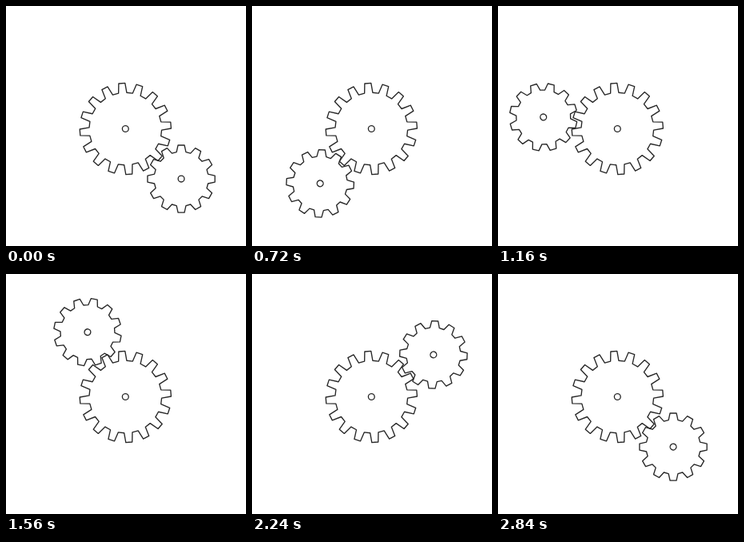
Animation, 300 px wide and 300 px high, one loop 2880 ms. Source, as an HTML page:

```html
<!DOCTYPE html>
<html lang="en">
<head>
<meta charset="utf-8">
<title>Rolling gears</title>
<style>
  html, body { margin: 0; width: 100%; height: 100%; overflow: hidden; background: #fff; }
  svg { display: block; width: 100vw; height: 100vh; }
  g { fill: none; stroke: #262626; stroke-width: 1.35; stroke-linejoin: round; }
</style>
</head>
<body>
<svg viewBox="0 0 300 300">
  <g id="fixed"><path/><circle r="3.9"/></g>
  <g id="roller"><path/><circle r="3.9"/></g>
</svg>
<script>
  const STEP = 40, STEPS = 72;
  const CENTER = { x: 149.3, y: 153.5 };
  const ORBIT = 93.7, START = 41.9;
  const RAD = Math.PI / 180;

  const big = { teeth: 16, tip: 57.1, root: 45.3, tipHalf: 4, rootHalf: 6.5 };
  const small = { teeth: 12, tip: 42.3, root: 34, tipHalf: 5.4, rootHalf: 10 };

  // Trapezoid teeth, the first one pointing straight up
  function gearPath({ teeth, tip, root, tipHalf, rootHalf }) {
    const points = [];
    const add = (radius, degrees) => points.push(
      (radius * Math.sin(degrees * RAD)).toFixed(2) + ' ' +
      (-radius * Math.cos(degrees * RAD)).toFixed(2));
    for (let i = 0; i < teeth; i++) {
      const middle = i * 360 / teeth;
      add(root, middle - rootHalf);
      add(tip, middle - tipHalf);
      add(tip, middle + tipHalf);
      add(root, middle + rootHalf);
    }
    return 'M' + points.join('L') + 'Z';
  }

  function place(node, x, y, degrees) {
    node.setAttribute('transform', `translate(${x} ${y}) rotate(${degrees})`);
  }

  const fixed = document.getElementById('fixed');
  const roller = document.getElementById('roller');
  fixed.firstChild.setAttribute('d', gearPath(big));
  roller.firstChild.setAttribute('d', gearPath(small));
  place(fixed, CENTER.x, CENTER.y, -4.5);

  // The first and last step of the loop share one pose
  function draw(time) {
    const step = Math.floor(time / STEP) % STEPS;
    const turn = step * 360 / (STEPS - 1);
    const angle = (START + turn) * RAD;
    place(roller,
      CENTER.x + ORBIT * Math.cos(angle),
      CENTER.y + ORBIT * Math.sin(angle),
      turn * (1 + big.teeth / small.teeth));
  }

  const start = performance.now();
  function tick() {
    draw(performance.now() - start);
    requestAnimationFrame(tick);
  }
  tick();
</script>
</body>
</html>
```
